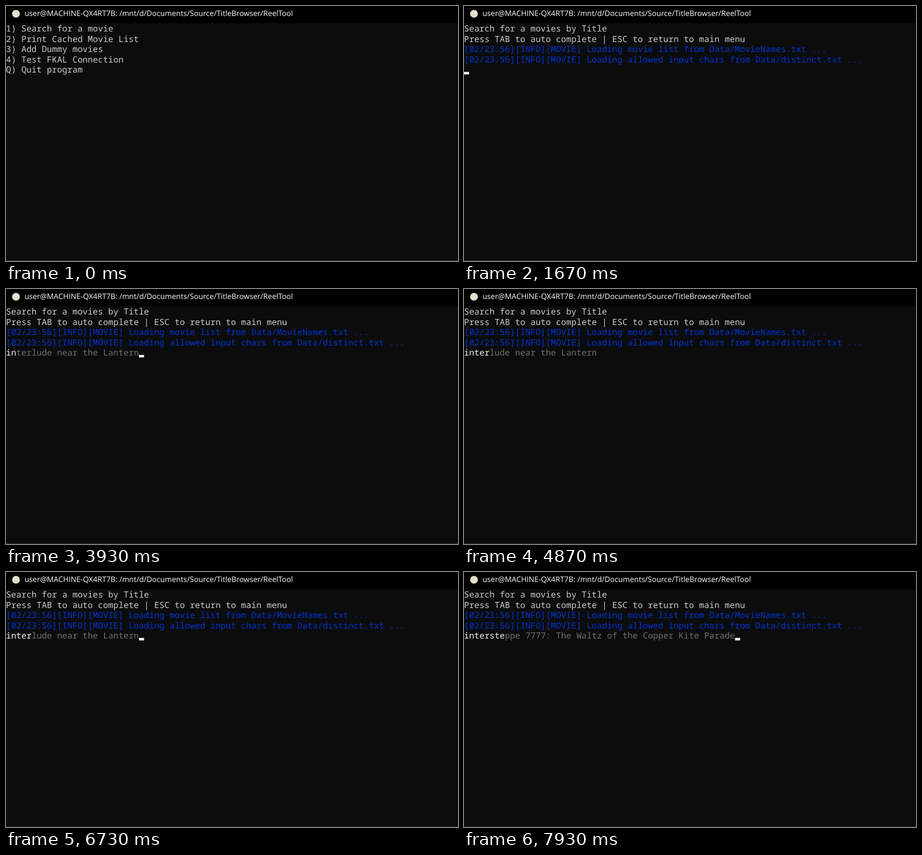
An HTML page for the animation above (8 s loop, 816 by 460 pixels).

```html
<!DOCTYPE html>
<html lang="en">
<head>
<meta charset="utf-8">
<title>Terminal</title>
<style>
  html, body { margin: 0; width: 100%; height: 100%; overflow: hidden; background: #0c0c0c; }
  svg { display: block; width: 816px; height: 460px; }
  text { white-space: pre; text-rendering: geometricPrecision; }
  #title { font: 13.62px "Open Sans", "Noto Sans", sans-serif; fill: #fff; }
  #screen { font: 15.385px "Noto Sans Mono", "DejaVu Sans Mono", monospace; }
  .plain { fill: #ccc; }
  .info { fill: #0034d0; }
  .typed { fill: #f2f2f2; }
  .hint { fill: #707070; }
</style>
</head>
<body>
<svg viewBox="0 0 816 460">
  <rect width="816" height="460" fill="#0c0c0c"/>
  <rect width="816" height="31" fill="#000"/>
  <rect y="459" width="816" height="1" fill="#333"/>
  <circle cx="18" cy="14" r="7" fill="#e6dfce"/>
  <text id="title" x="33.5" y="18">user@MACHINE-QX4RT7B: /mnt/d/Documents/Source/TitleBrowser/ReelTool</text>
  <g id="screen"></g>
  <rect id="cursor" width="9.23" height="4.6" fill="#f2f2f2"/>
</svg>
<script>
const LOOP = 8000, CELL = 9.231, ROW = 18.46, BASELINE = 46.3, CURSOR_TOP = 45;
const SEARCH_AT = 1600;
const screen = document.getElementById('screen');
const cursor = document.getElementById('cursor');

const menu = [
  ['plain', '1) Search for a movie'],
  ['plain', '2) Print Cached Movie List'],
  ['plain', '3) Add Dummy movies'],
  ['plain', '4) Test FKAL Connection'],
  ['plain', 'Q) Quit program']
];
const search = [
  ['plain', 'Search for a movies by Title'],
  ['plain', 'Press TAB to auto complete | ESC to return to main menu'],
  ['info', '[02/23:56][INFO][MOVIE] Loading movie list from Data/MovieNames.txt ...'],
  ['info', '[02/23:56][INFO][MOVIE] Loading allowed input chars from Data/distinct.txt ...']
];

const LANTERN = 'interlude near the Lantern';
const NUMBERED = 'interstice 47';
// [time, typed letters, suggested title]
const typing = [
  [0, 0, ''],
  [3200, 1, 'idle Harbors'],
  [3800, 2, LANTERN],
  [4000, 3, LANTERN],
  [4070, 4, LANTERN],
  [4200, 5, LANTERN],
  [6870, 6, NUMBERED],
  [7130, 7, NUMBERED],
  [7600, 8, 'intersteppe 7777: The Waltz of the Copper Kite Parade']
];
// [time, cursor visible]
const blink = [
  [0, 0], [70, 1], [670, 0], [1200, 1], [2800, 0], [3200, 1],
  [4730, 0], [5270, 1], [5800, 0], [6330, 1]
];

const stepAt = (steps, time) => steps.findLast(step => step[0] <= time);

function addText(parent, tag, className, content) {
  const node = document.createElementNS('http://www.w3.org/2000/svg', tag);
  node.setAttribute('class', className);
  node.textContent = content;
  return parent.appendChild(node);
}

function makePage(lines) {
  const page = screen.appendChild(document.createElementNS('http://www.w3.org/2000/svg', 'g'));
  lines.forEach(([className, content], row) => {
    addText(page, 'text', className, content).setAttribute('y', BASELINE + row * ROW);
  });
  return page;
}

const menuPage = makePage(menu);
const searchPage = makePage([...search, ['typed', '']]);
const input = searchPage.lastChild;
const typed = addText(input, 'tspan', 'typed', '');
const hint = addText(input, 'tspan', 'hint', '');

function render(time) {
  const searching = time >= SEARCH_AT;
  const [, count, title] = stepAt(typing, time);
  menuPage.style.display = searching ? 'none' : '';
  searchPage.style.display = searching ? '' : 'none';
  typed.textContent = title.slice(0, count);
  hint.textContent = title.slice(count);
  cursor.setAttribute('x', title.length * CELL);
  cursor.setAttribute('y', CURSOR_TOP + ROW * (searching ? 4 : 5));
  cursor.style.display = stepAt(blink, time)[1] ? '' : 'none';
}

const start = performance.now();
function tick() {
  render((performance.now() - start) % LOOP);
  requestAnimationFrame(tick);
}
tick();
</script>
</body>
</html>
```
